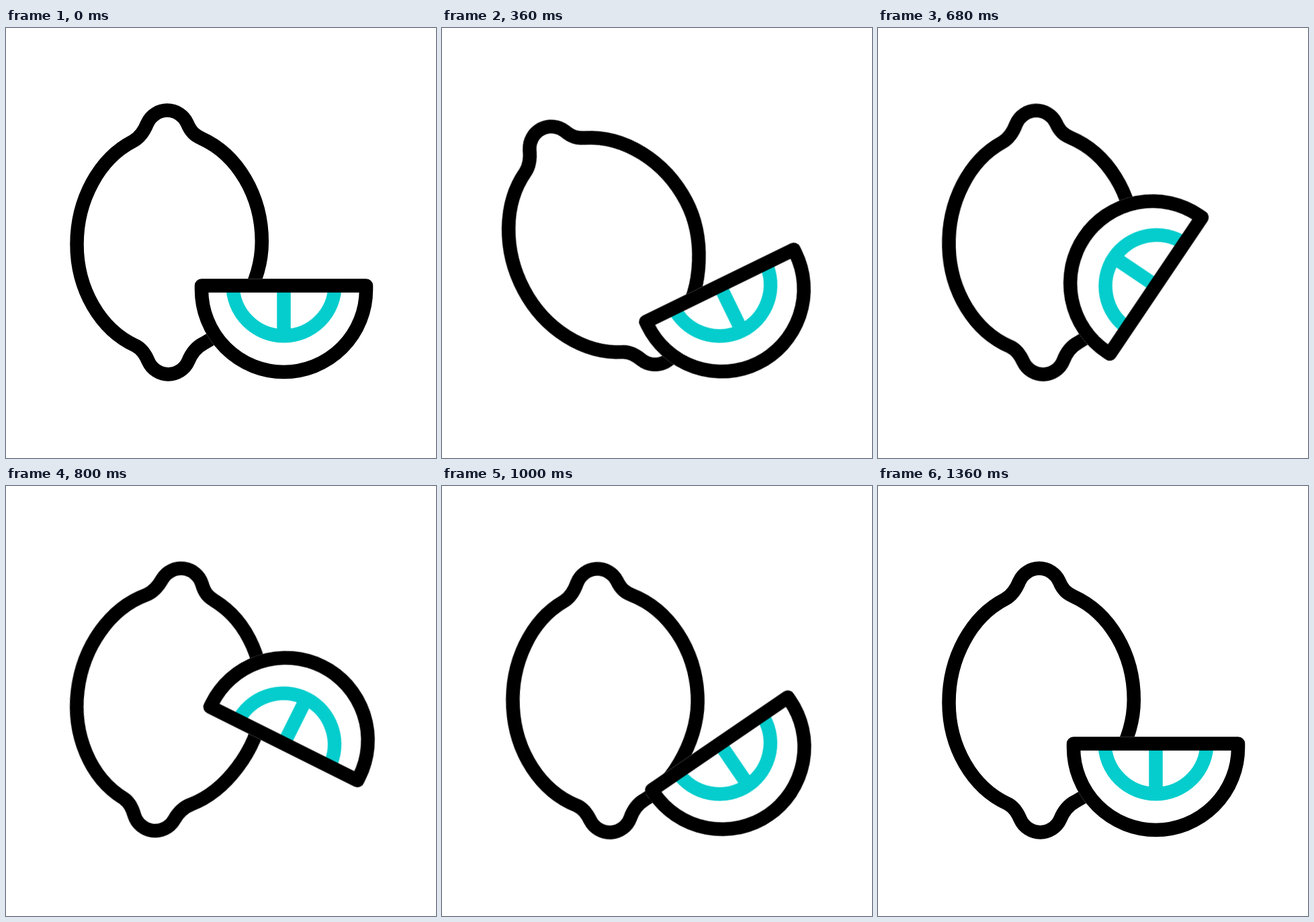
An HTML page for the animation above (2000 ms loop, 640 by 640 pixels).

```html
<!DOCTYPE html>
<html lang="en">
<head>
<meta charset="utf-8">
<title>Lemon and slice</title>
<style>
  html, body { margin: 0; width: 100%; height: 100%; overflow: hidden; background: #fff; }
  svg {
    display: block; width: 100%; height: 100%;
    fill: none; stroke: #000; stroke-width: 20.5; stroke-linejoin: round;
  }
  .back { fill: #fff; stroke: #fff; }
  .pulp { stroke: #05cdcd; }

  .lemon, .slice { animation: 2s infinite cubic-bezier(.333, 0, .667, 1); }
  .lemon { transform-origin: 250px 323px; animation-name: sway; }
  .slice { transform-origin: 413.5px 383.5px; animation-name: spin; }

  @keyframes sway {
    0% { transform: rotate(0deg); animation-timing-function: cubic-bezier(.42, 0, .667, 1); }
    21% { transform: rotate(-29.5deg); }
    40% { transform: rotate(7deg); animation-timing-function: cubic-bezier(.4, 0, .667, 1); }
    58% { transform: rotate(-11deg); }
    68%, 100% { transform: rotate(0deg); }
  }
  @keyframes spin {
    0% { transform: rotate(0deg); }
    12.25% { transform: rotate(-26.5deg); }
    19.1% { transform: rotate(-26deg); animation-timing-function: cubic-bezier(.23, 0, .73, 1); }
    56.35%, 100% { transform: rotate(360deg); }
  }
</style>
</head>
<body>
<svg viewBox="0 0 640 640">
  <defs>
    <path id="half" d="M291 383.5V389.5A122.5 122.5 0 0 0 536 389.5V383.5Z"/>
  </defs>
  <path class="lemon" d="M105.5 322
    C105.5 256 138.5 194.5 189 168.5
    C199 163.3 205 155 210.4 141.7
    A32.5 32.5 0 0 1 269.6 141.7
    C275 155 281.5 160 291 164.3
    C344.5 188.5 380.8 249.8 380.8 318
    C380.8 378 342 444 294 469.5
    C283 475 276 484 271.1 496.3
    A32.5 32.5 0 0 1 211.9 496.3
    C207 484.5 202 477.5 193 473
    C140.2 448.7 105.5 388.6 105.5 322Z"/>
  <g class="slice">
    <use class="back" href="#half"/>
    <path class="pulp" d="M337.5 382.3A76 76 0 0 0 489.5 382.3M413.5 383.5V458"/>
    <use href="#half"/>
  </g>
</svg>
</body>
</html>
```
